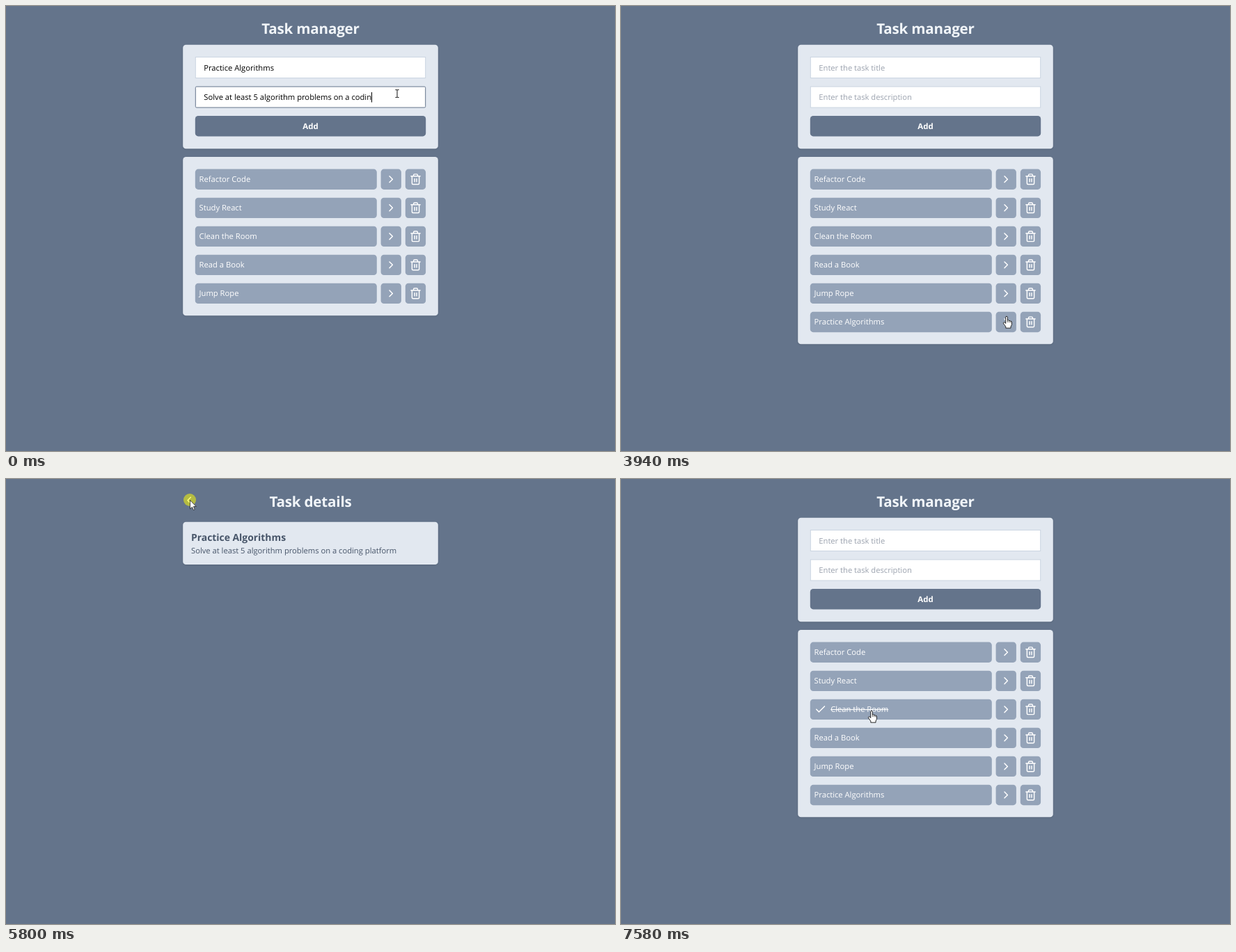
These frames come from a looping animation (875x640 px, 8000 ms). An HTML page:

```html
<!DOCTYPE html>
<html lang="en">
<head>
<meta charset="utf-8">
<title>Task manager</title>
<style>
  html, body { margin: 0; width: 100%; height: 100%; overflow: hidden; background: #64748b; }
  svg { display: block; width: 875px; height: 640px; }
  text { font: 11.2px "Open Sans", "Noto Sans", sans-serif; text-rendering: geometricPrecision; white-space: pre; }
  .title { font-size: 20.6px; font-weight: 700; letter-spacing: -.2px; fill: #f1f5f9; text-anchor: middle; }
  .panel { fill: #e2e8f0; filter: drop-shadow(0 1px 1px rgba(0, 0, 0, .1)); }
  .field { fill: #fff; stroke: #cbd5e1; }
  .field.focus { stroke: #64748b; }
  .hint { fill: #9ca3af; }
  .add { font-size: 11.4px; font-weight: 700; fill: #fff; text-anchor: middle; }
  .box { fill: #94a3b8; }
  .label { fill: #fff; }
  .icon { fill: none; stroke: #fff; stroke-width: 2; stroke-linecap: round; stroke-linejoin: round; }
  .heading { font-size: 13.9px; font-weight: 700; fill: #475569; }
  .note { fill: #475569; }
  .done { text-decoration: line-through; }
</style>
</head>
<body>
<svg viewBox="0 0 875 640">
  <g id="manager">
    <text class="title" x="437.5" y="40">Task manager</text>
    <rect class="panel" x="254.2" y="55.7" width="366.6" height="149.6" rx="4.4"/>
    <rect class="field" x="272.3" y="73.5" width="330.4" height="30"/>
    <rect class="field" id="field" x="272.3" y="116" width="330.4" height="30"/>
    <text id="name" x="284.3" y="93"></text>
    <text id="detail" x="284.3" y="135.4"></text>
    <rect id="caret" y="124" width="1" height="14.5"/>
    <rect x="271.8" y="158" width="331.4" height="29.4" rx="4.4" fill="#64748b"/>
    <text class="add" x="437.5" y="177">Add</text>
    <rect class="panel" id="list" x="254.2" y="217" width="366.6" rx="4.4"/>
    <g id="rows"></g>
  </g>
  <g id="details">
    <path class="icon" transform="translate(254.4 21.9) scale(.7333)" d="M15 18l-6-6 6-6"/>
    <text class="title" x="437.5" y="40">Task details</text>
    <rect class="panel" x="254.2" y="61.7" width="366.6" height="61.4" rx="4.4"/>
    <text class="heading" x="266" y="89.4">Practice Algorithms</text>
    <text class="note" x="266" y="107">Solve at least 5 algorithm problems on a coding platform</text>
  </g>
  <circle id="press" r="9" fill="#ff0" fill-opacity=".52"/>
  <g id="cursor">
    <path id="beam" fill="none" stroke="#111" d="M-2.5-5.5H-.7L0-5 .7-5.5H2.5M0-5V5M-2.5 5.5H-.7L0 5 .7 5.5H2.5"/>
    <path id="arrow" fill="#fff" stroke="#222" stroke-width=".8" d="M.5.5V13L3.4 10.3 5.3 14.6 7.2 13.8 5.4 9.6H9.2Z"/>
    <g id="hand">
      <path fill="#fff" stroke="#111" stroke-width=".9" stroke-linejoin="round" d="M-1.3 9.5V.8Q-1.3-.7 0-.7T1.3.8V5Q3 4.2 3.7 5.6 5.2 5 5.8 6.3 7.4 6 7.4 8V11.5L6 14V16.2H-1.2V14.2L-4.4 9.8Q-5 8.2-3.8 7.8T-1.3 9.5Z"/>
      <path fill="none" stroke="#111" stroke-width=".7" d="M1.3 5V8M3.7 5.6V8.2M5.8 6.3V8.4"/>
    </g>
  </g>
</svg>
<script>
const LOOP = 8000;
const tasks = ["Refactor Code", "Study React", "Clean the Room", "Read a Book", "Jump Rope", "Practice Algorithms"];
const sentence = "Solve at least 5 algorithm problems on a coding platform";
const keyTimes = [140, 220, 480, 680, 740, 880, 1070, 1200, 1270, 1400];
const presses = [[2610, 2750], [4140, 4280], [5730, 5870], [7440, 7580]];
const ADDED = 2750, OPENED = 4280, RETURNED = 5870, CHECKED = 7580;

// Cursor hot spot: time, x, y
const path = [
  [0, 562, 126], [1930, 562, 126], [2340, 552, 232], [2540, 534, 173], [2890, 534, 173],
  [3160, 660, 200], [3370, 775, 290], [3580, 690, 390], [3730, 567, 430], [3940, 554, 447],
  [4610, 554, 447], [5030, 430, 260], [5450, 276, 40], [5590, 264, 30], [5870, 264, 30],
  [6130, 328, 170], [6270, 350, 281], [6620, 365, 363], [6830, 367, 389], [7090, 365, 368],
  [7370, 360, 334], [LOOP, 360, 334]
];
const captureStarts = [1930, 2750, 4680, 5520, 6340];

const $ = id => document.getElementById(id);
const show = (el, on) => el.setAttribute("visibility", on ? "inherit" : "hidden");
const setText = (el, value) => { if (el.textContent !== value) el.textContent = value; };
const inside = (x, y, left, top, right, bottom) => x >= left && x <= right && y >= top && y <= bottom;

const icons = {
  next: "M9 18l6-6-6-6",
  trash: "M3 6H21M19 6V20C19 21 18 22 17 22H7C6 22 5 21 5 20V6M8 6V4C8 3 9 2 10 2H14C15 2 16 3 16 4V6M10 11V17M14 11V17",
  check: "M20 6L9 17 4 12"
};
const icon = (name, x, y) =>
  `<path class="icon ${name}" transform="translate(${x - 8.8} ${y - 8.8}) scale(.7333)" d="${icons[name]}"/>`;
const box = (x, y, width) => `<rect class="box" x="${x}" y="${y - 14.6}" width="${width}" height="29.3" rx="4.4"/>`;

$("rows").innerHTML = tasks.map((task, i) => {
  const y = 249.2 + 41.05 * i;
  return `<g>${box(271.8, y, 261)}${box(538.6, y, 29.3)}${box(573.8, y, 29.3)}
    <text class="label" x="277.6" y="${y + 4}">${task}</text>
    ${icon("next", 553.2, y)}${icon("trash", 588.5, y)}${i === 2 ? icon("check", 286.6, y) : ""}</g>`;
}).join("");
const rows = [...$("rows").children];
const cleanLabel = rows[2].querySelector("text");
const checkMark = rows[2].querySelector(".check");

function captureTime(t) {
  const start = captureStarts.filter(s => s <= t).pop() ?? 0;
  return start + Math.floor((t - start) / 70) * 70;
}

function slope(i, axis) {
  const a = path[i - 1], b = path[i], c = path[i + 1];
  const resting = !a || !c || [a, c].some(p => p[1] === b[1] && p[2] === b[2]);
  return resting ? 0 : (c[axis] - a[axis]) / (c[0] - a[0]);
}

function cursorAt(t) {
  const i = Math.max(0, path.findIndex(p => p[0] > t) - 1);
  const a = path[i], b = path[i + 1], span = b[0] - a[0], u = (t - a[0]) / span;
  return [1, 2].map(axis =>
    (1 + 2 * u) * (1 - u) ** 2 * a[axis] + u * (1 - u) ** 2 * span * slope(i, axis) +
    u * u * (3 - 2 * u) * b[axis] - u * u * (1 - u) * span * slope(i + 1, axis));
}

function cursorKind(x, y, onDetails, count) {
  if (onDetails) return "arrow";
  if (inside(x, y, 272, 73, 603, 104) || inside(x, y, 272, 116, 603, 146)) return "beam";
  if (inside(x, y, 272, 158, 603, 187)) return "hand";
  const offset = y - 234.6, onRow = offset >= 0 && offset < 41.05 * count && offset % 41.05 < 29.3;
  const onColumn = [[272, 533], [538.6, 568], [574, 603]].some(([l, r]) => x >= l && x <= r);
  return onRow && onColumn ? "hand" : "arrow";
}

function draw(t) {
  const onDetails = t >= OPENED && t < RETURNED;
  const added = t >= ADDED, checked = t >= CHECKED, focused = t < presses[0][0];
  const count = added ? 6 : 5;
  show($("manager"), !onDetails);
  show($("details"), onDetails);

  const typed = sentence.length - keyTimes.filter(k => k > t).length;
  setText($("name"), added ? "Enter the task title" : "Practice Algorithms");
  setText($("detail"), added ? "Enter the task description" : sentence.slice(0, typed));
  for (const id of ["name", "detail"]) $(id).classList.toggle("hint", added);
  $("field").classList.toggle("focus", focused);
  $("field").setAttribute("rx", focused ? 1.5 : 0);

  const lastKey = keyTimes.filter(k => k <= t).pop() ?? 0;
  const caretOn = focused && Math.floor((t - lastKey) / 530) % 2 === 0;
  show($("caret"), caretOn);
  if (caretOn) $("caret").setAttribute("x", Math.round(284.3 + $("detail").getComputedTextLength()));

  $("list").setAttribute("height", added ? 269.3 : 228.3);
  show(rows[5], added && !onDetails);
  show(checkMark, checked);
  cleanLabel.classList.toggle("done", checked);
  cleanLabel.setAttribute("x", checked ? 301.2 : 277.6);

  const [x, y] = cursorAt(captureTime(t));
  const kind = cursorKind(x, y, onDetails, count);
  const place = `translate(${x} ${y})`;
  $("cursor").setAttribute("transform", place);
  $("press").setAttribute("transform", place);
  show($("press"), presses.some(([from, to]) => t >= from && t < to));
  for (const id of ["beam", "arrow", "hand"]) show($(id), id === kind);
}

const begun = performance.now();
function tick() {
  draw((performance.now() - begun) % LOOP);
  requestAnimationFrame(tick);
}
tick();
</script>
</body>
</html>
```
